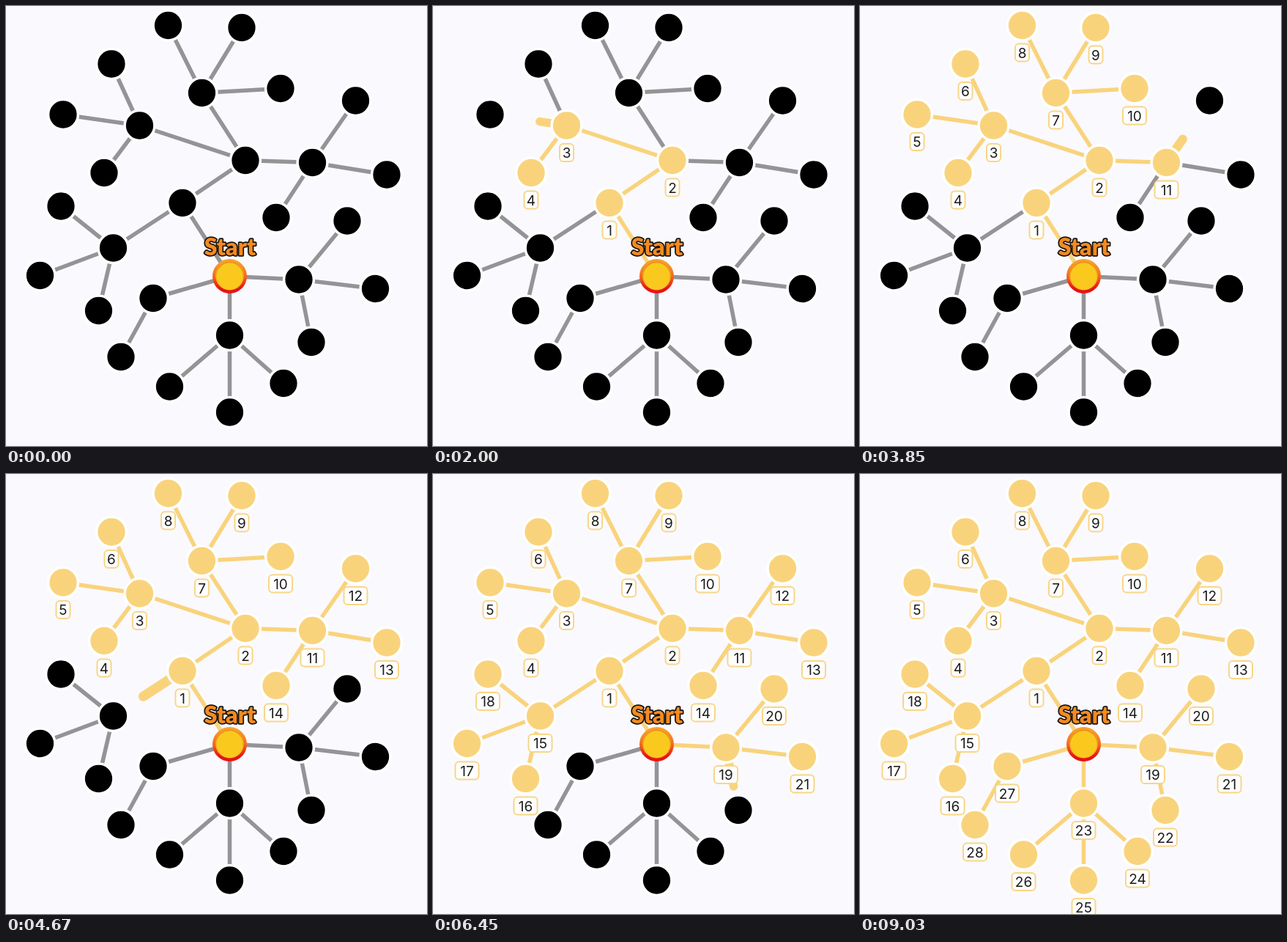
An HTML page for the animation above (9.06 s loop, 575 by 600 pixels).

```html
<!DOCTYPE html>
<html lang="en">
<head>
<meta charset="utf-8">
<title>Depth-first search</title>
<style>
  html, body { margin: 0; width: 100%; height: 100%; overflow: hidden; background: #faf9fd; }
  svg { display: block; width: 575px; height: 600px; }
  .edge { stroke: #959396; stroke-width: 5.5; }
  .edge.on { stroke: #f9d37c; stroke-linecap: round; }
  .node { fill: #000; stroke: #fff; stroke-width: 3.5; }
  .node.on { fill: #f9d37c; }
  .label rect { fill: #fff; stroke: #f8d688; stroke-width: 2; }
  .label text { font: 400 19px Inter, sans-serif; fill: #1c1c1c; text-anchor: middle; }
  .start {
    font: 900 32px Lato, sans-serif; fill: #f58a1f; stroke: #161310; stroke-width: 3.4;
    stroke-linejoin: round; paint-order: stroke; text-anchor: middle;
  }
</style>
</head>
<body>
<svg viewBox="0 0 575 600">
  <defs>
    <linearGradient id="ring" x1="0" y1="0" x2="0" y2="1">
      <stop offset="0.1" stop-color="#f6a02a"/>
      <stop offset="0.5" stop-color="#f26a1f"/>
      <stop offset="0.85" stop-color="#e61414"/>
    </linearGradient>
    <linearGradient id="rim" x1="0" y1="0" x2="0" y2="1">
      <stop offset="0" stop-color="#ee8d1c"/>
      <stop offset="1" stop-color="#f9c41f"/>
    </linearGradient>
  </defs>
  <g id="edges"></g>
  <g id="nodes"></g>
  <circle cx="305.5" cy="368.5" r="23.5" fill="url(#ring)"/>
  <circle cx="305.5" cy="368" r="18.6" fill="#fac91e" stroke="url(#rim)" stroke-width="1.6"/>
  <g id="labels"></g>
  <text class="start" x="306" y="339.5">Start</text>
</svg>
<script>
const LOOP = 9060, GROW = 150, POP = 90, GAP = 22;

// x, y, parent; listed in visiting order after the start node
const tree = [
  [305.5, 368.5, 0],
  [241, 268.5, 0], [327, 210.5, 1], [182.5, 163, 2], [134, 227.5, 3], [78, 148, 3],
  [144, 79, 3], [267.5, 118.5, 2], [221.5, 26.5, 7], [322, 29.5, 7], [375, 112.5, 7],
  [418.5, 213.5, 2], [477.5, 129, 11], [520, 230, 11], [369, 288.5, 11],
  [146.5, 330, 1], [126.5, 415.5, 15], [46.5, 367.5, 15], [75, 273, 15],
  [400, 373, 0], [466, 293, 19], [504.5, 385.5, 19], [417, 458.5, 19],
  [305.5, 449, 0], [379, 514.5, 23], [305.5, 554, 23], [223.5, 519, 23],
  [201, 398.5, 0], [157, 478.5, 27]
];

const clamp = v => Math.min(1, Math.max(0, v));
// the walk gains a little speed with every step
const stepStart = k => 884 + 272.4 * k - 0.6 * k * k;

function add(parent, tag, attrs) {
  const el = document.createElementNS("http://www.w3.org/2000/svg", tag);
  for (const name in attrs) el.setAttribute(name, attrs[name]);
  return parent.appendChild(el);
}

const [edges, nodes, labels] = ["edges", "nodes", "labels"].map(id => document.getElementById(id));

const steps = tree.slice(1).map(([x, y, parent], i) => {
  const [px, py] = tree[parent];
  const edge = add(edges, "line", { class: "edge", x1: px, y1: py, x2: x, y2: y });
  const node = add(nodes, "circle", { class: "node", r: 20.4 });
  const label = add(labels, "g", { class: "label" });
  const w = i < 9 ? 19 : 32;
  add(label, "rect", { x: -w / 2, y: -12, width: w, height: 24, rx: 5 });
  add(label, "text", { y: 7 }).textContent = i + 1;
  return { x, y, px, py, edge, node, label, len: Math.hypot(x - px, y - py), at: stepStart(i) };
});

function drawStep(s, t) {
  const p = clamp((t - s.at) / GROW);
  const q = clamp((t - s.at - GROW) / POP);
  const started = t >= s.at, visited = p === 1;

  const tip = started && !visited ? (GAP + p * (s.len - 2 * GAP)) / s.len : 1;
  s.edge.classList.toggle("on", started);
  s.edge.setAttribute("x2", s.px + (s.x - s.px) * tip);
  s.edge.setAttribute("y2", s.py + (s.y - s.py) * tip);
  s.edge.style.strokeWidth = 5.5 + 8.3 * Math.sin(Math.PI * p);

  const scale = 1 + Math.sin(Math.PI * q) ** 2;
  s.node.classList.toggle("on", visited);
  s.node.setAttribute("transform", `translate(${s.x} ${s.y}) scale(${scale})`);

  s.label.style.display = visited ? "" : "none";
  s.label.setAttribute("transform", `translate(${s.x} ${s.y + 37}) scale(${Math.sin(q * Math.PI / 2)})`);
}

function frame() {
  const t = performance.now() % LOOP;
  for (const s of steps) drawStep(s, t);
  requestAnimationFrame(frame);
}
frame();
</script>
</body>
</html>
```
